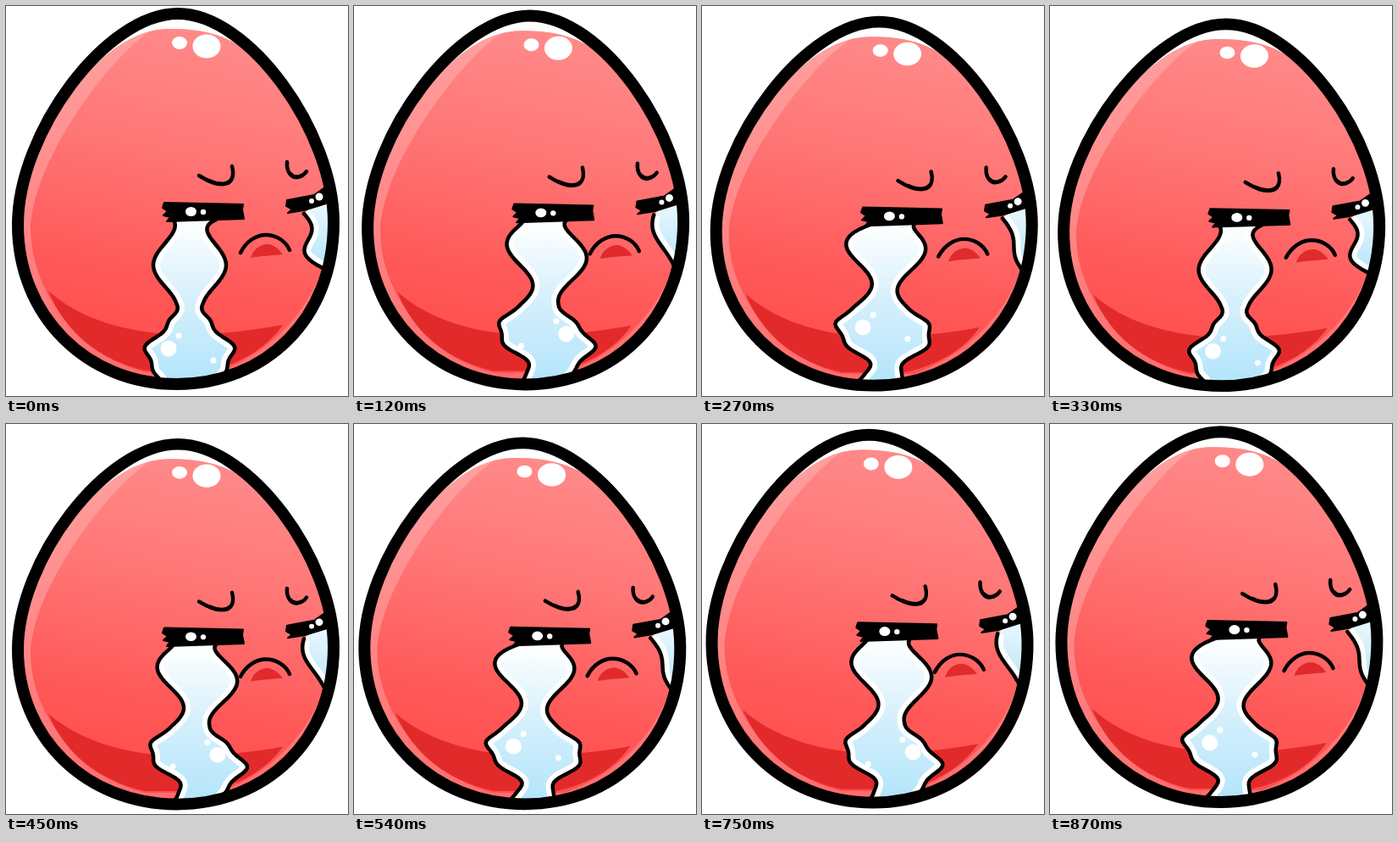
Recreate the animation shown at these times as an HTML page. Size 404 px wide and 460 px high, loop 0.9 s.

```html
<!DOCTYPE html>
<html lang="en">
<head>
<meta charset="utf-8">
<title>Crying egg</title>
<style>
  html, body { margin: 0; width: 100%; height: 100%; overflow: hidden; background: #fff; }
  svg { display: block; width: 404px; height: 460px; }
  .ink { fill: none; stroke: #000; stroke-width: 4.5; stroke-linecap: round; stroke-linejoin: round; }
</style>
</head>
<body>
<svg viewBox="0 0 404 460">
  <defs>
    <path id="shell" d="M203 9C118 9 14 150 14 258C14 365 95 446 202 446C305 446 387 370 387 255C387 150 288 9 203 9Z"/>
    <clipPath id="inShell"><use href="#shell"/></clipPath>
    <clipPath id="inTears"><path id="tearClip"/></clipPath>
    <linearGradient id="skin" gradientUnits="userSpaceOnUse" x1="245" y1="30" x2="165" y2="425">
      <stop offset="0" stop-color="#ff8a8a"/>
      <stop offset=".35" stop-color="#ff7777"/>
      <stop offset=".75" stop-color="#ff5858"/>
      <stop offset="1" stop-color="#ff4d4d"/>
    </linearGradient>
    <linearGradient id="rim" gradientUnits="userSpaceOnUse" x1="0" y1="40" x2="0" y2="440">
      <stop offset="0" stop-color="#ff9f9e"/>
      <stop offset=".6" stop-color="#ff8383"/>
      <stop offset="1" stop-color="#ff6c6c"/>
    </linearGradient>
    <linearGradient id="water" gradientUnits="userSpaceOnUse" x1="0" y1="262" x2="0" y2="440">
      <stop offset="0" stop-color="#fbfeff"/>
      <stop offset=".45" stop-color="#d6f0fc"/>
      <stop offset="1" stop-color="#b4e5fb"/>
    </linearGradient>
    <linearGradient id="water2" gradientUnits="userSpaceOnUse" x1="0" y1="238" x2="0" y2="310">
      <stop offset="0" stop-color="#e6f6fd"/>
      <stop offset="1" stop-color="#b6e4fa"/>
    </linearGradient>
  </defs>
  <g id="egg">
    <g clip-path="url(#inShell)">
      <use href="#shell" fill="#fff"/>
      <path fill="url(#rim)" d="M84 92C125 45 160 26 195 27C250 27 280 44 306 73C338 110 360 146 375 182L404 250V460H0V200Z"/>
      <path fill="url(#skin)" d="M170 30C119 63 29 188 29 265C31 345 95 415 165 432L250 432C322 405 372 345 380 280L404 250L375 182C360 146 338 110 306 73C280 44 250 27 195 27Q182 27 170 30Z"/>
      <path fill="#e32a2b" d="M50 336C86 368 136 383 190 387C240 389 290 383 327 376C312 398 285 420 240 430H165C110 418 70 385 50 336Z"/>
      <path id="tearL" fill="url(#water)"/>
      <path id="tearR" fill="url(#water2)"/>
      <path id="edge" clip-path="url(#inTears)" fill="none" stroke="#fff" stroke-width="16"/>
      <g id="bubbles" fill="#fff"></g>
      <path id="lines" class="ink"/>
    </g>
    <use href="#shell" fill="none" stroke="#000" stroke-width="14"/>
    <g stroke="#000" stroke-width="2" stroke-linejoin="round">
      <path d="M187 232L280 234L279 240L281 251L190 254L194 249L186 247L191 242L185 238Z"/>
      <path d="M332 229L364 223L378 213L384 231L352 241L333 244L338 240L331 236Z"/>
    </g>
    <g fill="#fff">
      <ellipse cx="218.500" cy="242.500" rx="6.500" ry="5.500"/>
      <circle cx="233" cy="243" r="3.200"/>
      <circle cx="361" cy="230" r="3"/>
      <circle cx="370" cy="225" r="4.500"/>
      <ellipse cx="205" cy="43.500" rx="9" ry="7.500"/>
      <ellipse cx="237" cy="47.500" rx="16.500" ry="14"/>
    </g>
    <path class="ink" d="M228 200C239 207 252 213 262 209C269 205 269 196 267 189M332 184C331 195 337 203 344 202C350 201 353 198 355 195M277 291C284 277 296 270 307 270C320 270 331 278 335 288"/>
    <path class="ink" d="M240 206C250 211 260 211 265 206M336 198Q342 204 349 200"/>
    <path fill="#e02a2b" d="M289 297C292 286 302 280 311 281C319 283 324 289 327 293C315 294 300 295 289 297Z"/>
  </g>
</svg>
<script>
const $ = id => document.getElementById(id);
const { sin, cos, exp, min, max, PI } = Math;
const LOOP = 900, STEP = 30, TOP = 252, FOOT = 444, WAVE = 104;

// bulge: height of the upper swelling; lag: how far the right side trails the left;
// side: where the big bubble sits; bend, curl: shape of the small tear
const poses = [
  { bulge: 304, sway: -3, swell: -1, lag: 0, side: -1, bend: 3, curl: 9 },
  { bulge: 346, sway: 0, swell: 3, lag: 2, side: -1, bend: 3, curl: 7 },
  { bulge: 286, sway: 5, swell: 5, lag: 9, side: 1, bend: 2, curl: -3 },
  { bulge: 319, sway: 9, swell: 8, lag: 2, side: -1, bend: 3, curl: 9 },
  { bulge: 276, sway: -6, swell: 6, lag: 4, side: -1, bend: 1, curl: 4 }
];

// One side (-1 left, 1 right) of the big tear: a wave running down the cheek
function bigEdge(p, side) {
  const pts = [];
  for (let y = TOP; y <= FOOT; y += 3) {
    const wide = (1 + cos(2 * PI * (y - p.bulge - side * p.lag) / WAVE)) / 2;
    const half = 15 + wide * (31 + p.swell + 0.08 * (y - 330));
    const ripple = 3.5 * min(1, max(0, (y - 350) / 20)) * cos(2 * PI * (y - 385) / 32);
    const spread = 12 * exp((y - FOOT) / 8);
    const x = 220 + p.sway + side * (half - ripple + spread);
    const pinch = exp((TOP - y) / 7);
    pts.push([x + pinch * (223 + side * 25 - x), y]);
  }
  return pts;
}

function smallEdge(p) {
  return Array.from({ length: 21 }, (_, i) => {
    const s = i / 20;
    return [352 + 28 * s ** p.bend + p.curl * sin(2 * PI * s), 245 + 67 * s];
  });
}

const join = pts => pts.map(p => p.map(v => v.toFixed(1))).join("L");

function bubbles({ bulge, sway, side }) {
  const y = bulge < 310 ? bulge + WAVE : bulge, x = 220 + sway;
  const dot = (dx, dy, r) => `<circle cx="${x + side * dx}" cy="${y + dy}" r="${r}"/>`;
  return dot(25, -4, 9.5) + dot(13, -19, 3.5) + dot(-28, 10, 3.5);
}

function setTears(p) {
  const l = bigEdge(p, -1), r = bigEdge(p, 1), s = smallEdge(p);
  const big = `M${join(l)}L${join(r.slice().reverse())}Z`;
  const small = `M${join(s)}H396V225L372 226Z`;
  const lines = [l, r, s].map(e => "M" + join(e)).join("");
  const paths = { tearL: big, tearR: small, tearClip: big + small, edge: lines, lines };
  for (const id in paths) $(id).setAttribute("d", paths[id]);
  $("bubbles").innerHTML = bubbles(p);
}

let shown;
function draw(now) {
  const step = Math.floor((now % LOOP) / STEP);
  const a = step * STEP / LOOP * 2 * PI;
  // Sway and squash, both anchored near the base
  const sway = 6.6 * sin(a), squash = (1 - cos(a)) / 2;
  const m = [1, 0, -sway / 450, 1 - 0.028 * squash, sway * 452 / 450, 15.06 * squash];
  $("egg").setAttribute("transform", `matrix(${m.map(v => v.toFixed(5))})`);
  const pose = poses[Math.floor(step / 2) % poses.length];
  if (pose !== shown) setTears(shown = pose);
}

function tick() {
  draw(performance.now());
  requestAnimationFrame(tick);
}
tick();
</script>
</body>
</html>
```
